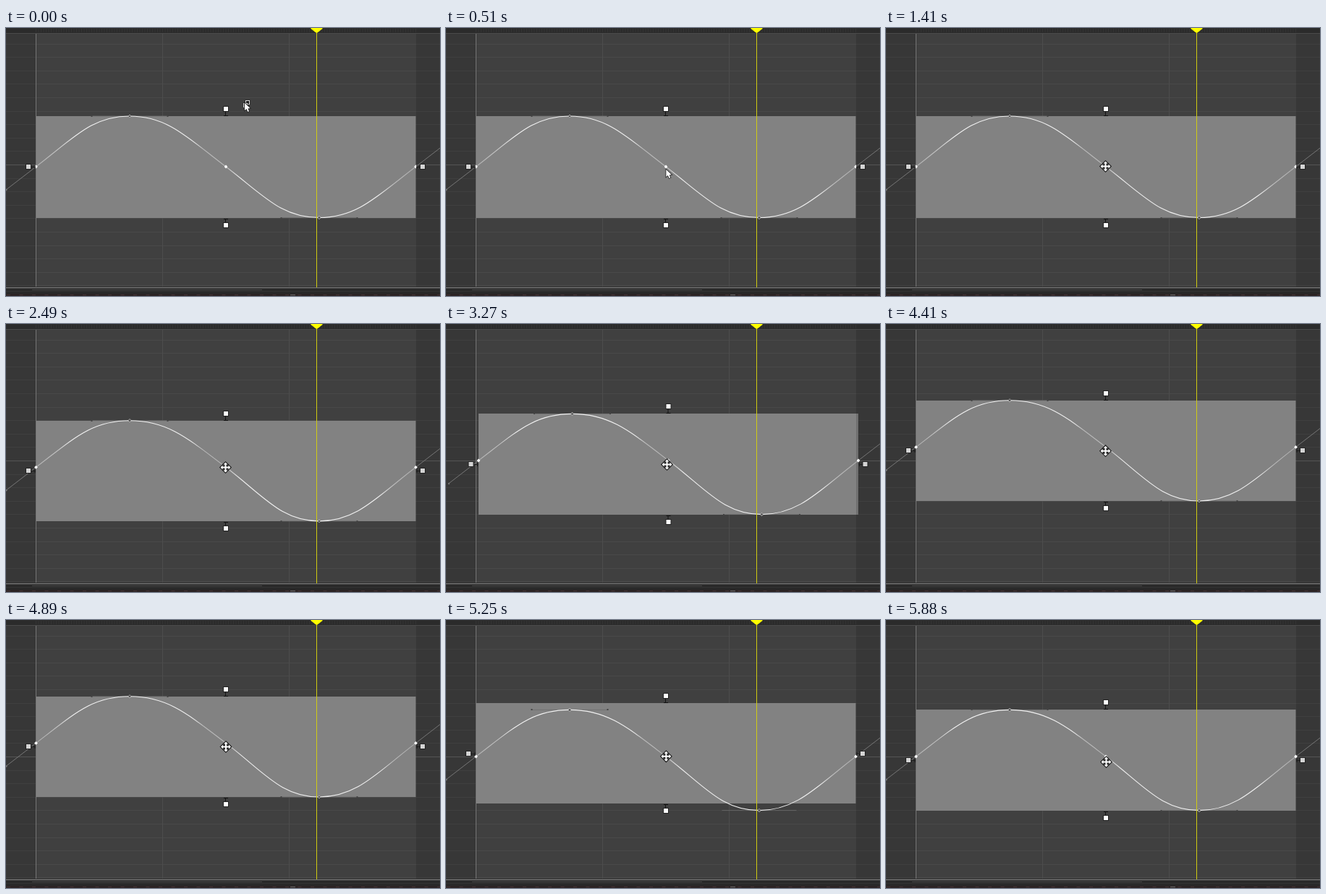
Recreate the animation shown at these times as an HTML page with a canvas. Size 600 by 371 pixels, loop 6030 ms.

```html
<!DOCTYPE html>
<html>
<head>
<meta charset="utf-8">
<style>
html, body { margin: 0; width: 100%; height: 100%; overflow: hidden; background: #404040; }
canvas { display: block; }
</style>
</head>
<body>
<canvas id="stage" width="600" height="371"></canvas>
<script>
const g = document.getElementById('stage').getContext('2d');
const LOOP = 6030, TICK = 30, DRAG = 2340, PRESS = 1410;
const LEFT = 41.5, RIGHT = 566.5, ZERO = 189, ROW = 18.6, SNAP = ROW / 2;

// Pointer hot spot: time, x, y
const path = [
  [0, 330, 104], [120, 326, 109], [300, 313, 158], [450, 305, 196], [540, 304, 196],
  [630, 303, 192], [780, 303.5, 191.5], [1020, 303.5, 191.5], [1110, 303, 191],
  [2340, 303, 191], [2400, 303, 197.6], [2490, 303, 198], [2700, 303.5, 203],
  [3150, 303.5, 203], [3200, 305, 195.5], [3270, 305, 194], [3300, 305.5, 194],
  [3600, 305.5, 194], [3690, 303, 193], [3960, 303, 193], [4050, 303, 185],
  [4300, 303, 176], [4560, 303, 174], [4860, 303, 174], [4890, 303.5, 175],
  [5430, 304, 195], [5820, 304, 195], [5880, 304, 196], [LOOP, 304, 196]
];

function pointer(t) {
  const i = Math.max(1, path.findIndex(p => p[0] >= t));
  const [t0, x0, y0] = path[i - 1], [t1, x1, y1] = path[i];
  const k = (t - t0) / (t1 - t0);
  return { x: x0 + (x1 - x0) * k, y: y0 + (y1 - y0) * k };
}

// Dragged keys snap to whole frames and half rows
function pose(t) {
  if (t < DRAG) return { dx: 0, mid: 192, top: 122, bottom: 262.5 };
  const p = pointer(t);
  const dy = SNAP * Math.floor((p.y - 187.7) / SNAP);
  return { dx: p.x > 304.6 ? 3.5 : 0, mid: ZERO + dy, top: 124.4 + dy, bottom: 263.6 + dy };
}

function rect(x, y, w, h, color) {
  g.fillStyle = color;
  g.fillRect(x, y, w, h);
}

function line(x0, y0, x1, y1, color, width = 1) {
  g.strokeStyle = color;
  g.lineWidth = width;
  g.beginPath();
  g.moveTo(x0, y0);
  g.lineTo(x1, y1);
  g.stroke();
}

function shape(points, fill, stroke, width = 1) {
  g.beginPath();
  points.forEach(([x, y]) => g.lineTo(x, y));
  g.closePath();
  if (stroke) {
    g.strokeStyle = stroke;
    g.lineWidth = width;
    g.stroke();
  }
  if (fill) {
    g.fillStyle = fill;
    g.fill();
  }
}

function diamond(x, y, r, fill, stroke) {
  shape([[x - r, y], [x, y - r], [x + r, y], [x, y + r]], fill, stroke);
}

function grid() {
  for (let i = -9; i <= 9; i++) if (i) rect(0, Math.round(ZERO + i * ROW), 600, 1, '#494949');
  rect(216, 8, 1, 351, '#4d4d4d');
  rect(391, 8, 1, 351, '#4d4d4d');
  rect(0, ZERO, 600, 1, '#626262');
}

function grip(x, y, color) {
  rect(x - 4, y - 4, 8, 8, '#222');
  rect(x - 3, y - 3, 6, 6, color);
}

function grips({ dx, top, bottom }) {
  const cx = 304 + dx, cy = Math.round((top + bottom) / 2);
  const t = Math.round(top), b = Math.round(bottom);
  rect(cx - 1, t - 6, 1, 6, '#111');
  rect(cx - 3, t - 1, 6, 1, '#111');
  rect(cx - 1, b + 1, 1, 6, '#111');
  rect(cx - 3, b + 1, 6, 1, '#111');
  grip(cx, t - 10, '#fff');
  grip(cx, b + 10, '#fff');
  for (const [x, s] of [[41 + dx, -1], [567 + dx, 1]]) {
    line(x, cy + .5, x + 6 * s, cy + .5, '#1c1c1c');
    line(x + s, cy - 2, x + s, cy + 3, '#1c1c1c');
    grip(x + 10 * s - (s > 0 ? 1 : 0), cy, '#d4d4d4');
  }
}

function curve({ dx, mid, top, bottom }) {
  g.save();
  g.translate(dx, 0);
  line(0, mid + 32, LEFT, mid, '#767676');
  line(RIGHT, mid, RIGHT + 41.5, mid - 32, '#767676');
  diamond(.5, mid + 32, 1.5, '#777');

  for (const [x, y] of [[171, top], [433, bottom]]) {
    line(x - 52, y, x + 52, y, '#6c6c6c', .8);
    for (const s of [-52.5, 52.5]) rect(x + s - 1, Math.round(y) - 1, 2, 2, '#444');
  }

  const shade = g.createLinearGradient(LEFT, 0, RIGHT, 0);
  [[0, '#b0b0b0'], [.06, '#c4c4c4'], [.1, '#f4f4f4'], [.41, '#eee'], [.44, '#b8b8b8'],
   [.5, '#b8b8b8'], [.54, '#eee'], [.9, '#f0f0f0'], [.94, '#bbb'], [1, '#aaa']]
    .forEach(([k, c]) => g.addColorStop ? 0 : shade.addColorStop(k, c));
  g.strokeStyle = shade;
  g.lineWidth = 1.1;
  g.beginPath();
  g.moveTo(LEFT, mid);
  g.bezierCurveTo(94, mid - 40, 118.5, top, 171, top);
  g.bezierCurveTo(223.5, top, 251.5, mid - 40, 304, mid);
  g.bezierCurveTo(356.5, mid + 40, 380.5, bottom, 433, bottom);
  g.bezierCurveTo(485.5, bottom, 514, mid + 40, RIGHT, mid);
  g.stroke();

  diamond(171, top, 2, '#555', '#fff');
  diamond(433, bottom, 2, '#555', '#fff');
  for (const x of [LEFT, 304, RIGHT]) diamond(x, mid, 2.4, '#fff');
  g.restore();
}

function chrome() {
  rect(0, 0, 600, 7, '#2b2b2b');
  for (let x = 41; x < 567; x += 3.5) rect(x, 1, 1, 5, '#343434');
  rect(0, 7, 600, 1, '#4b4b4b');
  rect(0, 358, 600, 1, '#363636');
  rect(0, 359, 600, 1, '#777');
  rect(0, 360, 600, 11, '#292929');
  rect(0, 360, 600, 1, '#3c3c3c');
  rect(36, 362, 318, 1, '#464646');
  rect(0, 364, 600, 1, '#343434');
  rect(0, 368, 600, 3, '#2b2324');
  for (let x = 1; x < 600; x += 17.5) rect(x, 369, 5, 1, '#443436');
  rect(393, 369, 7, 1, '#6a6a6a');
}

function playhead() {
  rect(429, 0, 1, 359, '#d0cc12');
  shape([[421.5, 0], [437.5, 0], [437.5, 1], [430.5, 6.5], [428.5, 6.5], [421.5, 1]], '#ff0');
}

function arrow({ x, y }, boxed) {
  if (boxed) {
    g.lineWidth = 1;
    g.strokeStyle = '#ddd';
    g.fillStyle = '#222';
    for (const [bx, by, s] of [[1.5, -3.5, 5], [-1.5, .5, 5]]) {
      g.fillRect(x + bx - 1, y + by - 1, s + 2, s + 2);
      g.strokeRect(x + bx, y + by, s, s);
    }
  }
  const tip = [[0, 0], [0, 10], [2.5, 8], [4.2, 12], [6, 11.2], [4.4, 7.4], [7.5, 7]];
  shape(tip.map(([a, b]) => [x + a, y + b]), '#fff', '#222', 1.6);
}

function moveCross({ x, y }) {
  const arm = [[-1, -1], [-1, -4], [-3, -4], [0, -7], [3, -4], [1, -4]];
  const cross = [0, 1, 2, 3].flatMap(q => arm.map(([a, b]) => {
    for (let i = 0; i < q; i++) [a, b] = [-b, a];
    return [x + .5 + a, y + .5 + b];
  }));
  shape(cross, '#fff', '#1a1a1a', 2.2);
}

function draw(now) {
  const t = Math.floor(now % LOOP / TICK) * TICK;
  const keys = pose(t);
  const box = t < DRAG ? keys : pose(Math.max(DRAG, t - 60)); // selection box trails the keys
  rect(0, 0, 600, 371, '#404040');
  grid();
  const top = Math.round(box.top);
  rect(LEFT + box.dx, top, 525, Math.round(box.bottom) - top, '#828282');
  rect(0, 8, 41, 350, 'rgba(0,0,0,.14)');
  rect(567, 8, 33, 350, 'rgba(0,0,0,.14)');
  rect(41, 8, 1, 350, '#757575');
  chrome();
  curve(keys);
  grips(box);
  playhead();
  const p = pointer(t);
  if (t < PRESS) arrow(p, t < 480);
  else moveCross(p);
  requestAnimationFrame(later);
}

let start;
function later(now) {
  start ??= now;
  draw(now - start);
}
requestAnimationFrame(later);
</script>
</body>
</html>
```
